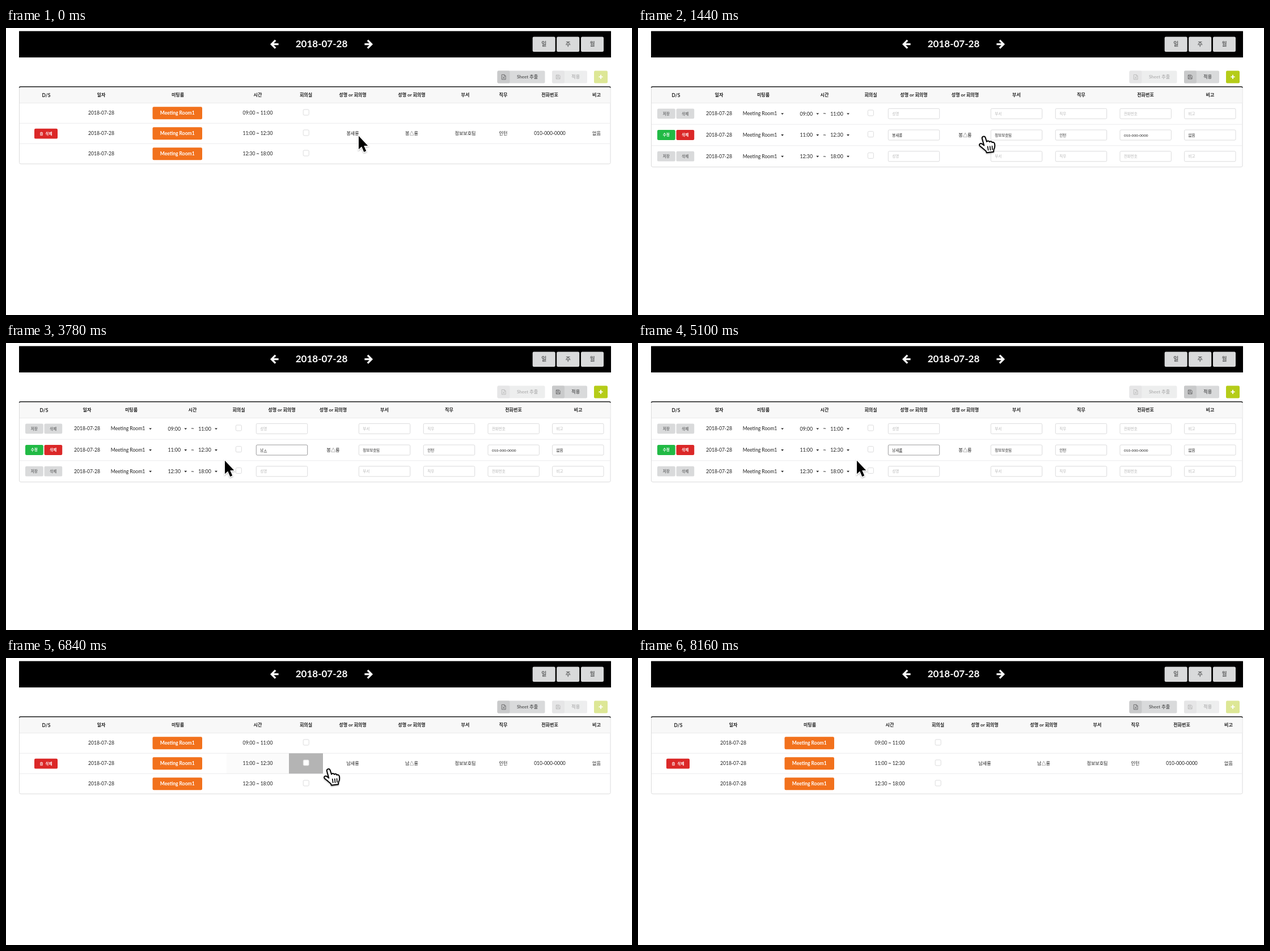
An HTML page for the animation above (8.34 s loop, 1104 by 507 pixels).

```html
<!DOCTYPE html>
<html lang="ko">
<head>
<meta charset="utf-8">
<title>Room booking table</title>
<style>
html, body { margin: 0; width: 100%; height: 100%; overflow: hidden; background: #fff; }
svg { display: block; width: 1104px; height: 507px; }
text { font-family: Lato, "Noto Sans CJK KR", "Noto Sans CJK", sans-serif; white-space: pre; }
</style>
</head>
<body>
<svg id="stage" viewBox="0 0 1104 507" xmlns="http://www.w3.org/2000/svg"></svg>
<script>
const LOOP = 8340, STEP = 60;
const EDIT_AT = 1440, SAVED_AT = 6120, ICONS_AT = 6300;
const OLD = '봉새룡', NEW = '남새룡', PHONE = '010-000-0000';
const INK = '#212121', GREY = '#d9dadb', DARK = '#c9cacb', LABEL = '#626364', LINE = '#d7d7d8';
const RED = '#db2828', GREEN = '#21ba45', ORANGE = '#f2711c', OLIVE = '#b5cc18';

// ---- drawing helpers ----
const hasKorean = s => /[\u3131-\ud7a3]/.test(s);
function text(s, x, cy, o = {}) {
  const size = o.size || (hasKorean(s) ? 8.05 : 8.5);
  return `<text x="${x}" y="${cy + size * 0.36}" font-size="${size}" font-weight="${o.bold ? 700 : 400}"` +
    ` text-anchor="${o.left ? 'start' : 'middle'}" fill="${o.fill || INK}"${o.id ? ` id="${o.id}"` : ''}>${s}</text>`;
}
const box = (x, y, x2, y2, fill, r = 0, extra = '') =>
  `<rect x="${x}" y="${y}" width="${x2 - x}" height="${y2 - y}" rx="${r}" fill="${fill}" ${extra}/>`;
const stroke = (d, color, w, extra = '') =>
  `<path d="${d}" fill="none" stroke="${color}" stroke-width="${w}" ${extra}/>`;
const group = (id, body, extra = '') => `<g id="${id}" ${extra}>${body}</g>`;
const icon = body => `<g class="icon">${body}</g>`;
const check = (x, y) => box(x - 5, y - 5, x + 5, y + 5, '#fff', 1.8, `stroke="${LINE}" stroke-width=".9"`);

function button(x, y, x2, y2, fill, label, o) {
  return box(x, y, x2, y2, fill, 2.2) + text(label, (x + x2) / 2, (y + y2) / 2, { bold: 1, ...o });
}

// ---- top bar and tool buttons ----
function topBar() {
  const arrow = stroke('M475.2 21.7 L468.3 28.7 L475.2 35.7 M468.8 28.7 H480.6', '#fff', 3.3);
  let s = box(23, 5.5, 1067, 52, '#000') + text('2018-07-28', 556.5, 28, { size: 17, bold: 1, fill: '#fff', id: 'date' });
  s += icon(arrow + `<g transform="translate(1113 0) scale(-1 1)">${arrow}</g>`);
  [['일', 928.7], ['주', 971.2], ['월', 1014]].forEach(([d, x]) => {
    s += button(x, 15.5, x + 40, 42, GREY, d, { size: 9.8, fill: LABEL });
  });
  return s;
}

function tools() {
  const sheet = stroke('M874.3 82.4 H879 L881.2 84.6 V90.9 H874.3 Z M878.8 82.5 V84.9 H881 M876.2 86 L879.3 89.6 M879.3 86 L876.2 89.6', LABEL, 0.85);
  const disk = stroke('M970.2 83 H975.5 L977.2 84.7 V90 H970.2 Z M971.8 83 V85.4 H974.8 V83 M971.8 90 V87.3 H975.6 V90', LABEL, 0.85);
  const plus = stroke('M1049 82.8 V90 M1045.4 86.4 H1052.6', '#fff', 1.9);
  return group('export', box(866.5, 75.5, 950.5, 97.5, GREY, 2.2) + box(866.5, 75.5, 888.5, 97.5, DARK, 2.2) +
      icon(sheet) + text('Sheet 추출', 919.5, 86.5, { bold: 1, fill: LABEL })) +
    group('apply', box(963, 75.5, 1025, 97.5, GREY, 2.2) + box(963, 75.5, 985, 97.5, DARK, 2.2) +
      icon(disk) + text('적용', 1004.7, 86.5, { bold: 1, fill: LABEL })) +
    group('add', box(1037, 75.5, 1061, 97.5, OLIVE, 2.2) + icon(plus));
}

// ---- tables ----
const HEADS = ['D/S', '일자', '미팅룸', '시간', '회의실', '성명 or 회의명', '성명 or 회의명', '부서', '직무', '전화번호', '비고'];
const HOURS = [['09:00', '11:00'], ['11:00', '12:30'], ['12:30', '18:00']];
const EDGES = [23.5, 118, 217.5, 389, 499, 559, 663, 767.5, 852, 901, 1017, 1066];
const VIEW_X = [71, 168, 303, 444, 529, 611.5, 715.5, 810, 877, 959, 1041.5];
const EDIT_X = [67, 143, 221, 329, 410.5, 486.5, 577, 667.5, 781.5, 895, 1009];

function frame(bottom, lines) {
  return box(23.5, 104, 1066, bottom, '#fff', 2.5, `stroke="${LINE}" stroke-width=".9"`) +
    box(24, 104, 1065.5, 132.5, '#f8f8f8') +
    lines.map(y => stroke(`M24 ${y} H1065.5`, '#e6e6e7', 0.8)).join('') +
    stroke('M23.5 105.5 Q23.5 103.8 26 103.8 H1063.5 Q1066 103.8 1066 105.5', '#1b1c1d', 1.5);
}
const heads = xs => HEADS.map((h, i) => text(h, xs[i], 118.5, { bold: 1 })).join('');

function viewTable() {
  let s = frame(240, [132.5, 168.3, 204.2]) + group('hover', '') + heads(VIEW_X);
  HOURS.forEach(([from, to], i) => {
    const y = 150.3 + 36 * i;
    s += text('2018-07-28', 168, y) + text(`${from} ~ ${to}`, 444, y) + check(529.2, y - 1.3);
    s += button(258.5, y - 11.1, 346, y + 11, ORANGE, 'Meeting Room1', { fill: '#fff' });
  });
  s += box(50, 177.8, 91, 195.6, RED, 2.2) + text('삭제', 75.5, 187, { size: 6.4, bold: 1, fill: '#fff' });
  s += icon(stroke('M60 185.2 H65 M61.6 185 V184.2 H63.4 V185 M60.7 185.4 V189.6 H64.3 V185.4 M62 186.4 V188.6 M63.1 186.4 V188.6', '#fff', 0.75));
  s += text(OLD, 611.5, 186.3, { id: 'name' }) + text('', 715.5, 186.3, { id: 'mask', size: 8.05 });
  ['정보보호팀', '인턴', PHONE, '없음'].forEach((v, i) => { s += text(v, VIEW_X[7 + i], 186.3); });
  return s;
}

const FIELDS = [[441, '성명', ''], [622, '부서', '정보보호팀'], [736, '직무', '인턴'], [849.7, '전화번호', PHONE], [963.3, '비고', '없음']];
const caret = (x, y) => `<path d="M${x - 2.4} ${y - 1} h4.8 l-2.4 2.7z" fill="${INK}"/>`;

function editTable() {
  let s = frame(245.5, [132.5, 170.2, 207.8]) + heads(EDIT_X);
  HOURS.forEach(([from, to], i) => {
    const y = 151.4 + 37.7 * i, own = i === 1;
    const look = { size: 6.5, fill: own ? '#fff' : '#737475' };
    s += button(34, y - 9, 65.7, y + 8.8, own ? GREEN : GREY, own ? '수정' : '저장', look);
    s += button(67.5, y - 9, 99.2, y + 8.8, own ? RED : GREY, '삭제', look);
    s += text('2018-07-28', 143, y) + text('Meeting Room1', 215, y, { size: 8.6 }) + caret(254.6, y);
    s += text(from, 296.7, y, { size: 8.8 }) + caret(316.7, y) + text('~', 329, y) +
      text(to, 350.5, y, { size: 8.8 }) + caret(370.5, y) + check(410.4, y - 1.4);
    FIELDS.forEach(([x, hint, value], k) => {
      s += box(x + .3, y - 9.1, x + 90.7, y + 9, '#fff', 2, `stroke="${LINE}" stroke-width=".9"` + (own && !k ? ' id="field"' : ''));
      const name = own && !k;
      if (!name) s += text(own ? value : hint, x + 7.2, y + .3, { size: 6.5, left: 1, fill: own ? INK : '#b5b5b5' });
    });
  });
  s += box(447.7, 184.2, 466.6, 193.4, '#b5b5b5', 0, 'id="select"') +
    text(OLD, 448.2, 189.4, { size: 6.5, left: 1, id: 'typed' }) +
    stroke('', INK, 0.7, 'id="under"') + text('', 577, 189.2, { id: 'mask2', size: 8.2 });
  s += group('menu', box(440.3, 198.5, 532, 256, '#fff', 1.5, 'filter="url(#soft)" stroke="#c9c9c9" stroke-width=".6"') +
    box(440.6, 231, 531.7, 255.7, '#f4f4f4') + stroke('M440.6 231 H531.7', '#dedede', 0.7) +
    text(OLD, 448, 215, { size: 7.5, left: 1 }) + text('관리...', 448, 243.5, { size: 7.5, left: 1 }));
  return s;
}

// ---- pointers, both with the tip at 0,0 ----
const HAND = '<path d="M-3.2 2.8 C-3.5 -.8 1.3 -1.6 2.5 1.4 L5 9 C5.8 6.9 9.2 7 10 9.3 C11.2 7.5 13.8 8 14.5 10.3 C16.2 9 18.6 10.2 19 13 C19.6 17 19 20 17.4 22.5 L17 26.8 L5 28.3 L3.7 25.4 C1 23 -2.6 19.6 -7 16.4 C-9.6 13.6 -6 10.6 -3.2 12.8 L.3 15.6 Z" fill="#fff" stroke="#000" stroke-width="1.9" stroke-linejoin="round"/>' +
  stroke('M6.7 17.4 L7.7 23.8 M10.7 17 L11.5 23.6 M14.5 16.6 L14.9 22.8', '#000', 1.6, 'stroke-linecap="round"');
const ARROW = '<path d="M0 .8 V24.2 L5.2 19.4 L9.3 29 L13.2 27.3 L9.2 18 H16.2 Z" fill="#000" stroke="#fff" stroke-width="2.4" paint-order="stroke"/>';

const stage = document.getElementById('stage');
stage.innerHTML = `<defs>
  <filter id="soft" x="-30%" y="-30%" width="170%" height="170%"><feDropShadow dx="0" dy="1.2" stdDeviation="1.3" flood-opacity=".35"/></filter>
  </defs>` + topBar() + tools() + group('view', viewTable()) + group('edit', editTable()) +
  group('pointer', group('hand', HAND) + group('arrow', ARROW), 'filter="url(#soft)"');

const $ = id => document.getElementById(id);
const show = (el, on) => el.setAttribute('display', on ? 'inline' : 'none');
const icons = [...document.querySelectorAll('.icon')];

// ---- motion: time, x, y ----
const PATH = [
  [0, 622, 190], [180, 622, 190], [420, 690, 193], [600, 725, 194], [780, 704, 195], [840, 678, 195], [900, 640, 195],
  [1080, 610, 192], [1440, 610, 192], [1860, 487, 191], [1980, 487, 191], [2220, 388, 198], [2400, 388, 198],
  [2580, 386, 207], [5160, 386, 207], [5640, 62, 192], [5880, 62, 192], [6180, 62, 202.5], [6420, 62, 202.5],
  [6660, 330, 200], [6720, 430, 198], [6780, 530, 197], [6840, 569, 196.5], [7080, 640, 200], [7320, 665, 225],
  [7560, 690, 400], [7740, 700, 540], [8340, 700, 540]
];

function slope(i, k) {
  if (!i || i === PATH.length - 1) return 0;
  const [p, q, r] = [PATH[i - 1], PATH[i], PATH[i + 1]];
  return (q[k] - p[k]) * (r[k] - q[k]) <= 0 ? 0 : (r[k] - p[k]) / (r[0] - p[0]);
}
function pos(t) {
  let i = 0;
  while (i < PATH.length - 2 && PATH[i + 1][0] <= t) i++;
  const a = PATH[i], b = PATH[i + 1], d = b[0] - a[0], u = Math.max(0, t - a[0]) / d;
  return [1, 2].map(k => {
    const s = u * u * (3 - 2 * u);
    return a[k] + (b[k] - a[k]) * s + d * u * (1 - u) * ((1 - u) * slope(i, k) - u * slope(i + 1, k));
  });
}

// The hovered cell trails the pointer by one step.
function cellAt(t) {
  if (t < 180 || (t >= EDIT_AT && t < ICONS_AT)) return null;
  const [x, y] = pos(t), row = Math.floor((y - 132.5) / 35.85);
  const col = EDGES.findIndex((e, i) => x >= e && x < EDGES[i + 1]);
  return col < 1 || row < 0 || row > 2 ? null : { row, col };
}
function shade(cell, alpha) {
  if (!cell) return '';
  const y = 132.5 + cell.row * 35.85;
  return box(EDGES[cell.col], y, EDGES[cell.col + 1], y + 35.85, '#b4b4b4', 0, `opacity="${alpha}"`);
}
function hover(t) {
  const now = cellAt(t - STEP), last = cellAt(t - 2 * STEP);
  const moved = last && (!now || now.row !== last.row || now.col !== last.col);
  return (moved ? shade(last, 0.05) : '') + shade(now, 1);
}

// Syllables as they are composed, one key at a time.
const KEYS = [[2700, 'ㄴ'], [3240, '나'], [3420, '남'], [3660, '남ㅅ'], [3900, '남새'], [4140, '남샐'], [4320, '남새료'], [4500, NEW]];
const masked = s => s[0] + '△' + s[2];

function draw(t) {
  const editing = t >= EDIT_AT && t < SAVED_AT, saved = t >= SAVED_AT;
  const bare = saved && t < ICONS_AT;
  show($('view'), !editing);
  show($('edit'), editing);
  $('export').setAttribute('opacity', editing ? 0.45 : 1);
  $('apply').setAttribute('opacity', editing ? 1 : 0.45);
  $('add').setAttribute('opacity', editing ? 1 : 0.45);
  icons.forEach(el => show(el, !bare));
  $('date').setAttribute('x', bare ? 559 : 556.5);

  const name = saved ? NEW : OLD;
  $('name').textContent = name;
  $('mask').textContent = masked(name);
  $('mask2').textContent = masked(OLD);
  $('hover').innerHTML = editing ? '' : hover(t);

  const focused = t >= 1920, key = KEYS.filter(k => k[0] <= t).pop();
  const value = key ? key[1] : OLD;
  $('typed').textContent = value;
  $('field').setAttribute('stroke', focused ? '#8f8f91' : LINE);
  show($('select'), focused && !key);
  show($('menu'), focused && !key);
  const end = 448.2 + value.length * 5.98;
  $('under').setAttribute('d', key ? `M${end - 5.7} 193 H${end}` : '');

  const arrow = t < 180 || (t >= 2460 && t < 5520);
  show($('arrow'), arrow);
  show($('hand'), !arrow);
  const [x, y] = pos(t);
  $('pointer').setAttribute('transform', `translate(${x.toFixed(2)} ${y.toFixed(2)})`);
}

const start = performance.now();
function tick() {
  const t = (performance.now() - start) % LOOP;
  draw(Math.floor(t / STEP) * STEP);
  requestAnimationFrame(tick);
}
draw(0);
requestAnimationFrame(tick);
</script>
</body>
</html>
```
